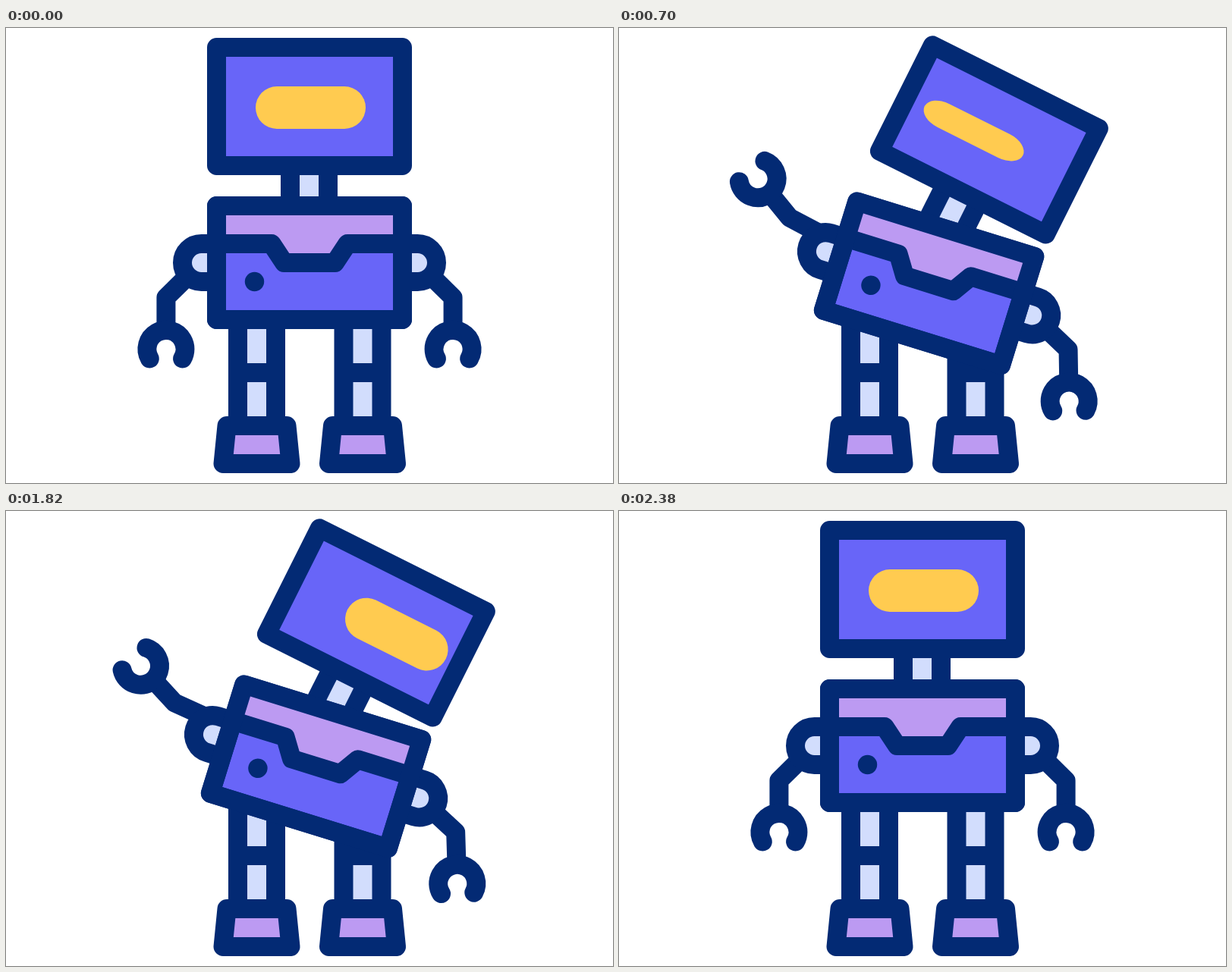
An HTML page with a canvas for the animation above (2.4 s loop, 800 by 600 pixels).

```html
<!DOCTYPE html>
<html lang="en">
<head>
<meta charset="utf-8">
<title>Waving robot</title>
<style>
  html, body { margin: 0; width: 100%; height: 100%; overflow: hidden; background: #fff; }
  canvas { display: block; width: 800px; height: 600px; }
</style>
</head>
<body>
<canvas id="stage" width="800" height="600"></canvas>
<script>
const ctx = document.getElementById('stage').getContext('2d');
const LOOP = 2400;
const NAVY = '#032a74', BLUE = '#6865f8', LILAC = '#bc9af2', PALE = '#d2ddfd', YELLOW = '#ffcb50';
const LINE = 25;
const rad = deg => deg * Math.PI / 180;

// Eased step from 0 to 1 between two times.
function ramp(t, from, to) {
  const s = Math.min(1, Math.max(0, (t - from) / (to - from)));
  return s * s * (3 - 2 * s);
}

// Up, hold, down again.
const pulse = (t, upFrom, upTo, downFrom, downTo) => ramp(t, upFrom, upTo) - ramp(t, downFrom, downTo);

// Each part moves as a sum of eased steps; arm angles are in degrees.
function poseAt(t) {
  const step = (from, to) => ramp(t, from, to);
  const lookLeft = pulse(t, 0, 455, 1000, 1280);
  const lookRight = pulse(t, 1000, 1280, 1760, 2105);
  return {
    lean: pulse(t, 0, 465, 1950, 2380),
    bend: pulse(t, 0, 600, 1830, 2380),
    wave: 112 + 85 * step(0, 400) + 48 * step(505, 1080) - 38.5 * step(1133, 1590) - 94.5 * step(1925, 2380),
    swing: 112 + 20 * step(0, 567) - 13 * step(567, 1133) + 12 * step(1133, 1840) - 19 * step(1840, 2380),
    eyeX: 32 * lookRight - 25 * lookLeft,
    eyeY: -3 * lookLeft,
    eyeOpen: 1 - 0.9 * pulse(t, 665, 745, 745, 825)
  };
}

function polar([x, y], radius, deg) {
  return [x + radius * Math.cos(rad(deg)), y + radius * Math.sin(rad(deg))];
}

function trace(points, closed) {
  ctx.beginPath();
  points.forEach(p => ctx.lineTo(...p));
  if (closed) ctx.closePath();
}

function outline() {
  ctx.strokeStyle = NAVY;
  ctx.lineWidth = LINE;
  ctx.lineJoin = 'round';
  ctx.stroke();
}

function fill(color) {
  ctx.fillStyle = color;
  ctx.fill();
}

function box(x, y, w, h, color) {
  ctx.fillStyle = color;
  ctx.fillRect(x, y, w, h);
}

// Symmetric four-sided panel, given by its centre line and half widths.
function panel(cx, top, bottom, halfTop, halfBottom, color) {
  trace([[cx - halfTop, top], [cx + halfTop, top], [cx + halfBottom, bottom], [cx - halfBottom, bottom]], true);
  if (color) fill(color);
  outline();
}

function rotateAbout(x, y, deg) {
  ctx.translate(x, y);
  ctx.rotate(rad(deg));
  ctx.translate(-x, -y);
}

function leg(cx) {
  box(cx - 37.5, 375, 75, 150, NAVY);
  for (const [top, height] of [[375, 67], [467, 50]]) box(cx - 12.5, top, LINE, height, PALE);
  panel(cx, 524.5, 574.5, 39.5, 44.5, LILAC);
}

function arm(reach, bend) {
  const shoulder = [257.5, 309.5];
  const fold = 1 - 1.17 * bend;
  const upper = reach + 23.4 * fold;
  const fore = reach - 22 * fold;
  const elbow = polar(shoulder, 65.4, upper);
  const hand = polar(elbow, 68 - 2 * bend, fore);

  ctx.lineCap = 'butt';
  trace([polar(shoulder, 26, upper + 26 * bend), elbow, polar(hand, -25, fore)]);
  outline();

  ctx.lineCap = 'round';
  ctx.beginPath();
  ctx.arc(...hand, 25, rad(fore + 60), rad(fore + 300));
  outline();

  ctx.beginPath();
  ctx.moveTo(280, 334.5);
  ctx.arc(...shoulder, 25, rad(90), rad(270));
  ctx.lineTo(280, 284.5);
  fill(PALE);
  outline();
}

function head(pose) {
  ctx.save();
  rotateAbout(400, 224.5, 9.4 * pose.lean);
  box(362, 181, 75, 58, NAVY);
  box(387, 181, 25, 58, PALE);
  panel(400, 25.5, 181.5, 122.5, 122.5, BLUE);

  ctx.translate(401.5 + pose.eyeX, 105 + pose.eyeY);
  ctx.scale(1, pose.eyeOpen);
  ctx.beginPath();
  ctx.arc(-44.5, 0, 28, rad(90), rad(270));
  ctx.arc(44.5, 0, 28, rad(-90), rad(90));
  fill(YELLOW);
  ctx.restore();
}

function torso() {
  const drawFrame = color => panel(400, 234.5, 384.5, 122.5, 122.5, color);
  const half = [[277.5, 284.5], [350, 284.5], [366.5, 309.5]];
  const seam = [...half, ...half.map(([x, y]) => [800 - x, y]).reverse()];
  drawFrame(BLUE);
  trace([...seam, [522.5, 234.5], [277.5, 234.5]], true);
  fill(LILAC);
  trace(seam);
  outline();
  drawFrame();
  ctx.beginPath();
  ctx.arc(327.5, 334.5, 12.7, 0, 2 * Math.PI);
  fill(NAVY);
}

function draw(t) {
  const pose = poseAt(t);
  box(0, 0, 800, 600, '#fff');
  leg(330.5);
  leg(470);

  ctx.save();
  rotateAbout(314, 351.5, 17.2 * pose.lean);
  arm(pose.wave, pose.bend);
  ctx.save();
  ctx.translate(800, 0);
  ctx.scale(-1, 1);
  arm(pose.swing, 0);
  ctx.restore();
  head(pose);
  torso();
  ctx.restore();
}

const start = performance.now();
function tick() {
  draw((performance.now() - start) % LOOP);
  requestAnimationFrame(tick);
}
tick();
</script>
</body>
</html>
```
